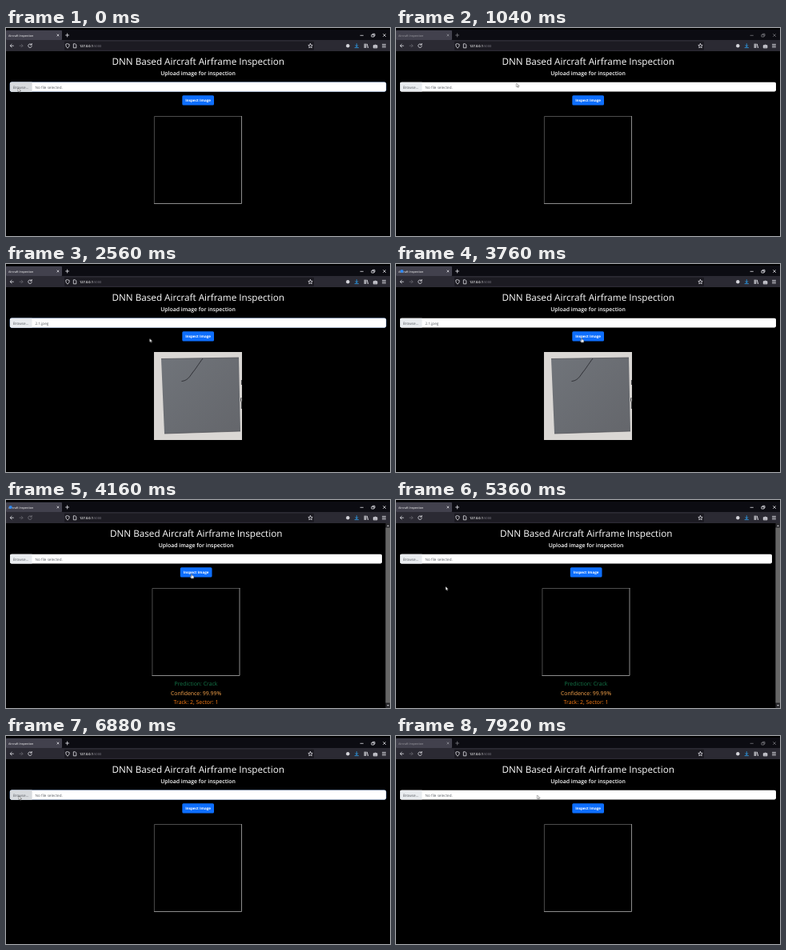
Write an HTML page that moves like this. It is 480 by 260 pixels and loops after 8 s.

```html
<!DOCTYPE html>
<html lang="en">
<head>
<meta charset="utf-8">
<title>Aircraft Inspection</title>
<style>
  html, body { margin: 0; width: 100%; height: 100%; overflow: hidden; background: #000; }
  svg { display: block; width: 480px; height: 260px; }
  text { font-family: "Open Sans", "Noto Sans", sans-serif; text-rendering: geometricPrecision; }
  .mid { text-anchor: middle; }
  .icon { fill: none; stroke: #e4e4ea; stroke-width: .8; stroke-linecap: round; stroke-linejoin: round; }
  .small { font-size: 4.65px; fill: #5c6066; }
  .result { font-size: 6.9px; font-weight: 500; }

  /* hard state changes */
  .strip, .page, .field, .ring, .hover, .photo, .report, .empty, .named, .arrow, .hand, .load, .reload {
    animation: 8s step-end infinite;
  }
  .strip { animation-name: strip; }
  .page { animation-name: page; }
  .field { width: 470px; animation-name: field; }
  .ring { animation-name: field, ring; }
  .hover { animation-name: hover; }
  .photo, .named { animation-name: chosen; }
  .empty { animation-name: unchosen; }
  .report { animation-name: report; }
  .hand { animation-name: hand; }
  .arrow { animation-name: arrow; }
  .load { animation-name: load; }
  .reload { animation-name: reload; }
  .dot { animation: bounce .4s ease-in-out infinite alternate; }
  .cursor { animation: move 8s ease-in-out infinite; }

  @keyframes strip { 0%, 19% { opacity: 1 } 6%, 87%, 100% { opacity: .5 } }
  @keyframes page { 0%, 79%, 100% { transform: none } 51% { transform: translateX(-2.5px) } }
  @keyframes field { 0%, 79%, 100% { width: 470px } 51% { width: 465px } }
  @keyframes ring { 0%, 19%, 82% { opacity: 1 } 6%, 45.5%, 87%, 100% { opacity: 0 } }
  @keyframes hover { 0%, 82% { opacity: 1 } 6%, 87%, 100% { opacity: 0 } }
  @keyframes chosen { 0%, 51%, 100% { opacity: 0 } 19.5% { opacity: 1 } }
  @keyframes unchosen { 0%, 51%, 100% { opacity: 1 } 19.5% { opacity: 0 } }
  @keyframes report { 0%, 79%, 100% { opacity: 0 } 51% { opacity: 1 } }
  @keyframes hand { 0%, 57%, 100% { opacity: 0 } 38% { opacity: 1 } }
  @keyframes arrow { 0%, 57%, 100% { opacity: 1 } 38% { opacity: 0 } }
  @keyframes load { 0%, 55.5%, 80.5%, 100% { opacity: 0 } 45.5%, 78.5% { opacity: 1 } }
  @keyframes reload { 0%, 57%, 100% { opacity: 1 } 51% { opacity: .4 } }
  @keyframes bounce { from { transform: translateX(0) } to { transform: translateX(5px) } }
  @keyframes move {
    0%, 6% { transform: translate(15px, 75px) }
    13%, 14% { transform: translate(150.5px, 69px) }
    18%, 25% { transform: translate(186px, 84px) }
    31%, 34% { transform: translate(179.5px, 93px) }
    40%, 56% { transform: translate(232px, 92.5px) }
    65%, 68% { transform: translate(62px, 108px) }
    75%, 79.5% { transform: translate(30px, 22px) }
    83.5%, 89% { transform: translate(16px, 75px) }
    98%, 100% { transform: translate(176.5px, 74px) }
  }
</style>
</head>
<body>
<svg viewBox="0 0 480 260">
  <defs>
    <linearGradient id="panel" x2="1" y2="1">
      <stop offset="0" stop-color="#70747a"/>
      <stop offset="1" stop-color="#64666b"/>
    </linearGradient>
  </defs>
  <rect width="480" height="260"/>

  <!-- tab strip -->
  <rect y="2" width="480" height="14" fill="#0c0c12"/>
  <rect y="3" width="70" height="12" rx="1" fill="#42414d"/>
  <g class="strip">
    <text x="3" y="10.6" font-size="3.7" font-weight="500" fill="#fff">Aircraft Inspection</text>
    <path class="icon" d="M63.9 8l2 2m0-2l-2 2" stroke-width=".6"/>
    <path class="icon" d="M74.6 9h4m-2-2v4"/>
    <path class="icon" d="M443 9.3h3.4M457.3 8.3h2.7v2.7h-2.7zM458.3 8.2v-.9h2.7V10h-.9M471.6 7.6l3 3m0-3l-3 3"/>
  </g>
  <g class="load"><circle class="dot" cx="4" cy="9" r="1.9" fill="#2b8cff"/></g>

  <!-- toolbar -->
  <rect y="15" width="480" height="14" fill="#2b2a33"/>
  <rect x="73" y="16.7" width="312" height="11" rx="1" fill="#1c1b22"/>
  <g class="icon">
    <path d="M9.3 22.2H5.2l1.9-1.9M5.2 22.2l1.9 1.9"/>
    <path stroke="#66656e" d="M17 22.2h4.1l-1.9-1.9M21.1 22.2l-1.9 1.9"/>
    <path class="reload" d="M31.8 20.7a2.3 2.3 0 1 0 .5 2M32.2 19.4v1.7h-1.7"/>
    <path d="M77 19.7l2.2.8c0 2.4-.6 3.6-2.2 4.6c-1.6-1-2.2-2.2-2.2-4.6z"/>
    <path d="M84.7 19.8h1.9l1.2 1.2v3.8h-3.1z"/>
    <path d="M380.5 19.6l.8 1.7 1.9.2-1.4 1.3.4 1.9-1.7-.9-1.7.9.4-1.9-1.4-1.3 1.9-.2z"/>
    <path stroke="#2ea3f2" d="M438.3 19.7v3.5m-1.4-1.4l1.4 1.5 1.4-1.5M436.1 24.6h4.4"/>
    <path stroke-width="1" d="M448.2 20v4.6M449.8 20v4.6M451.3 20.2l1.2 4.4"/>
    <path fill="#b8b8c0" d="M459.3 24.5v-2.8h1.4a1 1 0 0 1 1.9 0h1.3v2.8z"/>
    <path d="M470.5 20.4h4M470.5 22.2h4M470.5 24h4"/>
  </g>
  <circle cx="427.3" cy="22.2" r="2.2" fill="#d4d4da"/>
  <text x="92" y="23.8" font-size="4" fill="#85848e"><tspan font-weight="600" fill="#fff">127.0.0.1</tspan>:5000</text>

  <!-- page -->
  <g class="page">
    <text class="mid" x="240.2" y="46" font-size="11.7" font-weight="500" fill="#fff">DNN Based Aircraft Airframe Inspection</text>
    <text class="mid" x="240" y="58.8" font-size="6.9" font-weight="600" fill="#fff">Upload image for inspection</text>
    <rect x="220.3" y="84.2" width="39.7" height="12.4" rx="1.6" fill="#0d6efd"/>
    <text class="mid" x="240.1" y="92.2" font-size="4.55" font-weight="700" fill="#fff">Inspect Image</text>
    <path d="M185.4 220V110.5H295" fill="none" stroke="#555" stroke-width=".9"/>
    <path d="M294.5 110V219.5H185" fill="none" stroke="#8c8c8c"/>
    <g class="photo">
      <rect x="185" y="110" width="110" height="110" fill="#dad7d4"/>
      <path d="M194 118.5L291 117L293 209L198 212Z" fill="url(#panel)"/>
      <path d="M194 118.5L291 117M293 209L198 212" fill="none" stroke="#4c4d52" stroke-width=".7"/>
      <path d="M246 118C240 126 238 130 233 136C229 142 226 146 219.5 146.5" fill="none" stroke="#303136" stroke-width="1"/>
      <path d="M294.4 145v6M294 167q-1.2 3 .4 6v8" fill="none" stroke="#3b3b3d" stroke-width="1"/>
    </g>
    <g class="report mid">
      <text class="result" x="240" y="232" fill="#14794a">Prediction: Crack</text>
      <text class="result" x="240" y="243.5" fill="#ffa94d">Confidence: 99.99%</text>
      <text class="result" x="240" y="255" fill="#fd7e14">Track: 2, Sector: 1</text>
    </g>
  </g>

  <!-- file field -->
  <rect class="field ring" x="5" y="67.8" height="11.6" rx="2" fill="none" stroke="#86b7fe" stroke-opacity=".7" stroke-width=".9"/>
  <rect class="field" x="5" y="67.8" height="11.6" rx="1.8" fill="#fff"/>
  <path d="M32.5 67.8H6.8Q5 67.8 5 69.6V77.6Q5 79.4 6.8 79.4H32.5Z" fill="#e9ecef"/>
  <path class="hover" d="M32.5 67.8H6.8Q5 67.8 5 69.6V77.6Q5 79.4 6.8 79.4H32.5Z" fill="#d8dbde"/>
  <text class="small" x="8.7" y="75.6">Browse...</text>
  <text class="small empty" x="36.4" y="75.6">No file selected.</text>
  <text class="small named" x="36.4" y="75.6">2.1.jpeg</text>

  <!-- scrollbar -->
  <g class="report">
    <rect x="474.5" y="29" width="5.5" height="231" fill="#2b2b2e"/>
    <rect x="474.5" y="34.5" width="5.5" height="219" fill="#666"/>
    <path d="M476 33l1.5-1.8L479 33zM476 256l1.5 1.8L479 256z" fill="#c8c8cc"/>
  </g>

  <g class="cursor" fill="#fff" stroke="#222" stroke-width=".4" stroke-linejoin="round">
    <path class="arrow" d="M0 0v4.7l1.1-1 .8 1.8.9-.4-.8-1.7h1.5z"/>
    <path class="hand" d="M-.5 0q.6-.7 1.1 0v2l2 .5q.5.2.4.8L2.6 5.6H-.4L-2 3.4q.2-.7.8-.4l.7.6z"/>
  </g>
</svg>
</body>
</html>
```
